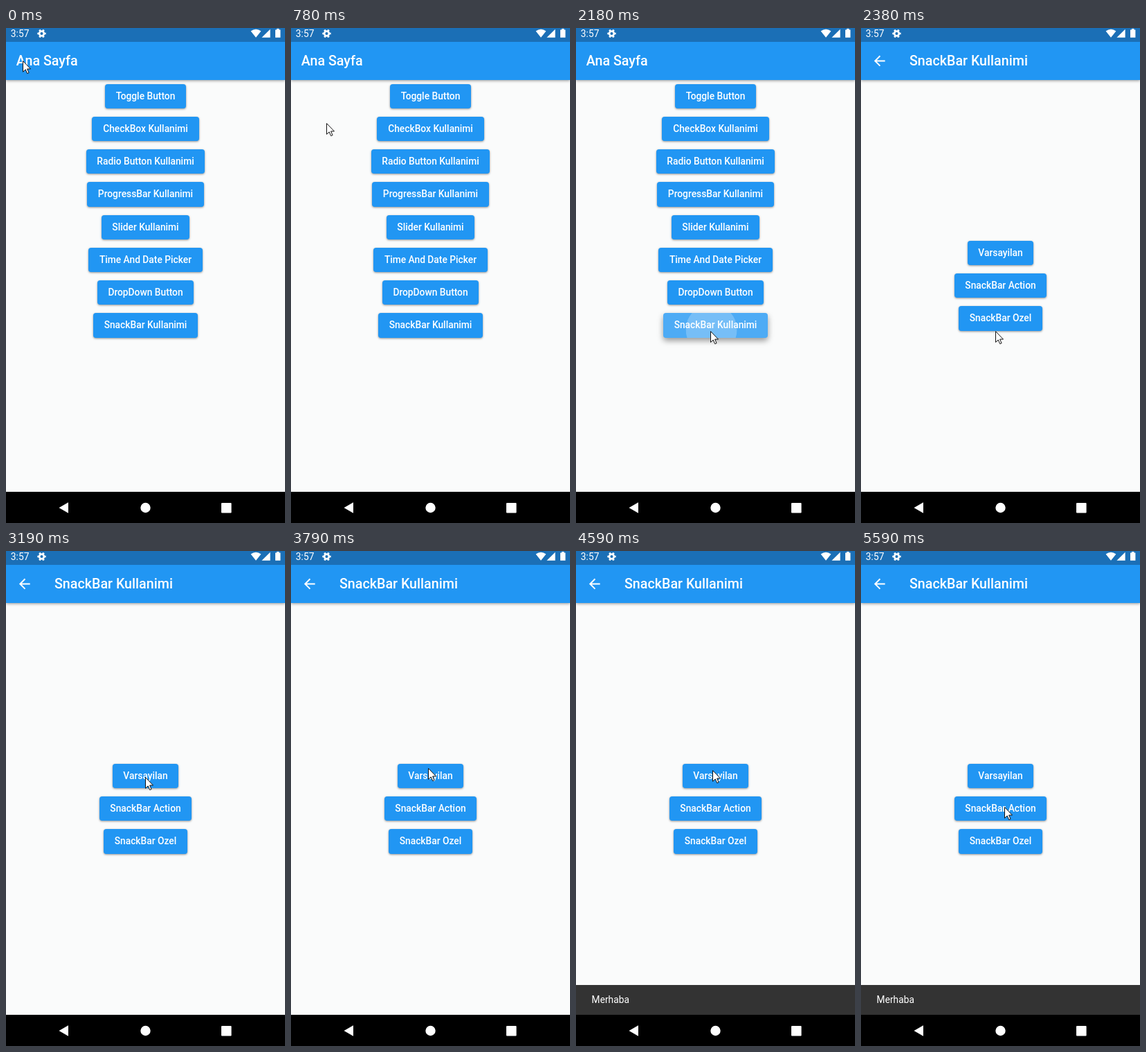
These frames come from a looping animation (403 px wide and 714 px high, 8000 ms). An HTML page:

```html
<!DOCTYPE html>
<html lang="tr">
<head>
<meta charset="utf-8">
<title>SnackBar Kullanimi</title>
<style>
  html, body { margin: 0; width: 100%; height: 100%; overflow: hidden; background: #fafbfb; }
  body { position: relative; font-family: Roboto, Arial, sans-serif; color: #fff; }
  .status, .bar, .nav, .page, .list, .title, .snack, svg { position: absolute; }

  .status { left: 0; top: 0; width: 403px; height: 20px; background: #1b6fb6; }
  .status span { position: absolute; left: 6.8px; top: 0; font-size: 13.8px; line-height: 17px; }
  .bar { left: 0; top: 20px; width: 403px; height: 55px; background: #2196f3;
         box-shadow: 0 1px 4px rgba(0, 0, 0, .42); }
  .nav { left: 0; top: 669px; width: 403px; height: 45px; background: #000; }
  svg { left: 0; top: 0; overflow: visible; fill: #fff; }

  .page { left: 0; top: 0; width: 403px; height: 669px; }
  .title { top: 20px; left: 14.8px; font-size: 19.7px; font-weight: 500; line-height: 55px; white-space: nowrap; }
  .second .title { left: 69.9px; }
  .list { top: 80.6px; left: 0; width: 403px; display: grid; justify-items: center; row-gap: 11.85px; }
  .second .list { top: 306.8px; }
  .btn { position: relative; height: 35.4px; padding: 0 15.76px; border-radius: 4px; overflow: hidden;
         background: #2196f3; box-shadow: 0 1px 3px rgba(0, 0, 0, .42);
         font-size: 13.79px; font-weight: 500; line-height: 35.4px; white-space: nowrap; }
  .tap::after { content: ""; position: absolute; inset: 0; background: #fff; opacity: 0; }

  .snack { left: 0; bottom: 45px; width: 403px; height: 0; overflow: hidden; background: #333;
           font-size: 13.79px; }
  .snack span { position: absolute; left: 22.6px; top: 0; line-height: 43px; }
  .frame { position: absolute; left: 0; top: 0; width: 403px; height: 714px; overflow: hidden; }

  /* Everything shares one 8 s clock and changes in hard steps. */
  .first, .second, .tap, .tap::after, .snack, .snack span, .cursor {
    animation: 8s step-end infinite;
  }
  .first { animation-name: leave; }
  .second { animation-name: enter; }
  .first .tap { animation-name: pressA; }
  .first .tap::after { animation-name: rippleA; }
  .second .tap { animation-name: pressB; }
  .second .tap::after { animation-name: rippleB; }
  .snack { animation-name: rise; }
  .snack span { animation-name: appear; }
  .cursor { animation-name: point; }

  @keyframes leave { 0% { visibility: visible } 29.75%, 100% { visibility: hidden } }
  @keyframes enter { 0% { visibility: hidden } 29.75%, 100% { visibility: visible } }

  @keyframes pressA {
    0% { background: #2196f3; box-shadow: 0 1px 3px rgba(0, 0, 0, .42) }
    24.75% { background: #41a5f5; box-shadow: 0 3px 7px rgba(0, 0, 0, .4) }
    27.25%, 100% { background: #4dabf5; box-shadow: 0 4px 8px rgba(0, 0, 0, .4) }
  }
  @keyframes rippleA {
    0% { opacity: 0; clip-path: circle(0 at 69.5px 25px) }
    24.75% { opacity: .22; clip-path: circle(27px at 69.2px 25px) }
    27.25%, 100% { opacity: .23; clip-path: circle(37px at 69.7px 24px) }
  }
  @keyframes pressB {
    0% { background: #2196f3; box-shadow: 0 1px 3px rgba(0, 0, 0, .42) }
    52.375% { background: #46a7f5; box-shadow: 0 4px 8px rgba(0, 0, 0, .4) }
    54.875% { background: #389ff4; box-shadow: 0 3px 6px rgba(0, 0, 0, .4) }
    57.375%, 100% { background: #2196f3; box-shadow: 0 1px 3px rgba(0, 0, 0, .42) }
  }
  @keyframes rippleB {
    0% { opacity: 0; clip-path: circle(0 at 44px 9px) }
    49.875% { opacity: .2; clip-path: circle(12px at 44px 9px) }
    52.375% { opacity: .23; clip-path: circle(21.5px at 44.5px 10px) }
    54.875% { opacity: .1; clip-path: circle(58px at 46px 14px) }
    57.375%, 100% { opacity: 0; clip-path: circle(0 at 44px 9px) }
  }

  @keyframes rise { 0% { height: 0 } 54.875% { height: 26px } 57.375%, 100% { height: 43px } }
  @keyframes appear { 0% { opacity: 0 } 57.375%, 100% { opacity: 1 } }

  @keyframes point {
    0% { transform: translate(24px, 47px) }
    2.5% { transform: translate(24px, 48px) }
    4.75% { transform: translate(28px, 57px) }
    7.25% { transform: translate(34px, 73px) }
    9.75% { transform: translate(51px, 137px) }
    12.25% { transform: translate(114px, 319px) }
    14.75% { transform: translate(179px, 413px) }
    17.25% { transform: translate(194px, 437px) }
    39.875% { transform: translate(201px, 326px) }
    42.375% { transform: translate(199px, 307px) }
    44.875% { transform: translate(198px, 310px) }
    47.375% { transform: translate(198px, 313px) }
    49.875% { transform: translate(197px, 316px) }
    67.375% { transform: translate(202px, 350px) }
    69.875%, 100% { transform: translate(207px, 369px) }
  }
</style>
</head>
<body>
<div class="frame">
  <div class="bar"></div>

  <div class="page first">
    <div class="title">Ana Sayfa</div>
    <div class="list">
      <div class="btn">Toggle Button</div>
      <div class="btn">CheckBox Kullanimi</div>
      <div class="btn">Radio Button Kullanimi</div>
      <div class="btn">ProgressBar Kullanimi</div>
      <div class="btn">Slider Kullanimi</div>
      <div class="btn">Time And Date Picker</div>
      <div class="btn">DropDown Button</div>
      <div class="btn tap">SnackBar Kullanimi</div>
    </div>
  </div>

  <div class="page second">
    <svg width="403" height="75">
      <path transform="translate(15 35.6) scale(.985)"
            d="M20 11H7.83l5.59-5.59L12 4l-8 8 8 8 1.41-1.41L7.83 13H20z"/>
    </svg>
    <div class="title">SnackBar Kullanimi</div>
    <div class="list">
      <div class="btn tap">Varsayilan</div>
      <div class="btn">SnackBar Action</div>
      <div class="btn">SnackBar Ozel</div>
    </div>
  </div>

  <div class="snack"><span>Merhaba</span></div>

  <div class="status">
    <span>3:57</span>
    <svg width="403" height="20">
      <g fill="none" stroke="#fff" transform="translate(51.5 8)">
        <circle r="3.4" stroke-width="2.7"/>
        <circle r="5.2" stroke-width="2" pathLength="12" stroke-dasharray="1" stroke-dashoffset=".5"/>
      </g>
      <path d="M353.6 4.6Q361 -1.2 368.4 4.6L361 13.8Z"/>
      <path d="M381.6 1.8V13.8H369.4Z"/>
      <path d="M389 2.4h2v-1.4h3.4v1.4h2v11.4h-7.4z"/>
    </svg>
  </div>

  <div class="nav">
    <svg width="403" height="45">
      <path d="M76.5 23L90 15.2V30.8Z"/>
      <circle cx="201.5" cy="23" r="7.2"/>
      <rect x="311" y="16" width="14.6" height="14.6" rx="1"/>
    </svg>
  </div>

  <svg class="cursor" width="13" height="20">
    <path d="M.5 .6V16.3L4.2 12.9 6.7 18.6 9.1 17.6 6.6 12H11.5Z" stroke="#111"/>
  </svg>
</div>
</body>
</html>
```
